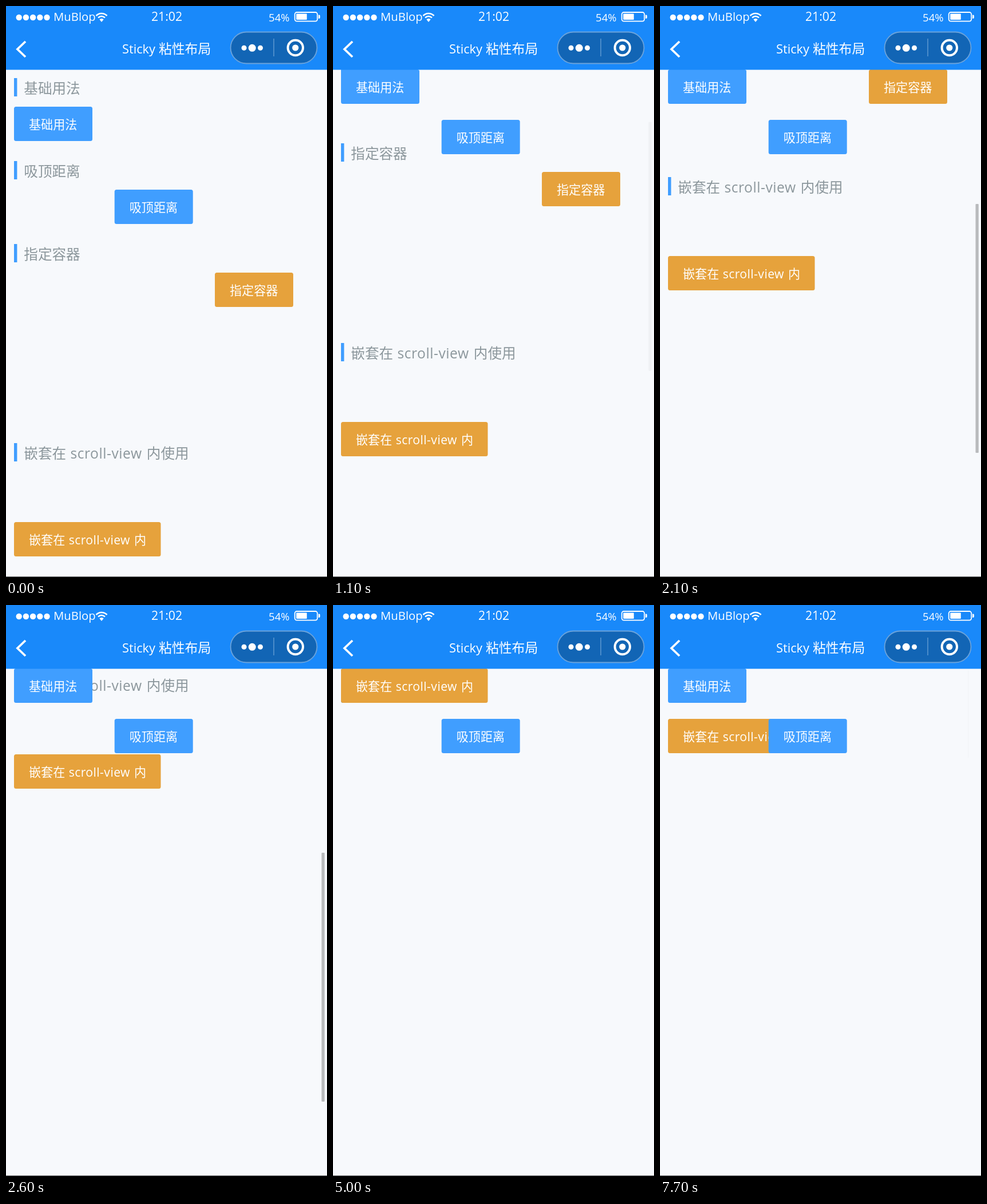
These frames come from a looping animation (561x998 px, 8 s). An HTML page with a canvas:

```html
<!DOCTYPE html>
<html lang="zh-CN">
<head>
<meta charset="utf-8">
<title>Sticky 粘性布局</title>
<style>
html, body { margin: 0; width: 100%; height: 100%; overflow: hidden; background: #f7f9fc; }
canvas { display: block; width: 100vw; height: 100vh; }
</style>
</head>
<body>
<canvas id="stage"></canvas>
<script>
const W = 561, H = 998, LOOP = 8000, TICK = 100;
const BLUE = '#409eff', AMBER = '#e6a23c', GREY = '#8c979c', HEADER = '#1989fa', PAGE = '#f7f9fc';
const FONT = '"Open Sans", "Noto Sans CJK SC", "Noto Sans CJK", sans-serif';
const TOP = 111.4;          // lower edge of the header
const NOTCH = 175.75;       // one wheel notch
const INNER_MAX = 437.5;
const BTN_H = 60, BTN_PAD = 26;

// Wheel moves: [start, duration, distance]
const pageMoves = [[420, 150, NOTCH], [1320, 150, NOTCH], [1950, 250, NOTCH], [2450, 250, NOTCH]];
const innerMoves = [
  [3050, 250, NOTCH], [3650, 250, NOTCH], [4250, 250, INNER_MAX - 2 * NOTCH],
  [6150, 250, -NOTCH], [6620, 150, -NOTCH], [6950, 250, 2 * NOTCH - INNER_MAX]
];

// Scrollbar opacity: [time, value], held until the next entry
const pageBar = [[0, 0], [500, .25], [1000, .12], [1100, .03], [1400, .25], [1800, .17], [1900, .1],
  [2000, .25], [3100, .1], [3200, .03], [3300, 0]];
const innerBar = [[0, 0], [3100, .27], [4800, .17], [4900, .07], [5000, 0],
  [6200, .27], [7600, .1], [7700, .01]];

const canvas = document.getElementById('stage');
const ctx = canvas.getContext('2d');

function smooth(p) {
  p = Math.min(1, Math.max(0, p));
  return p * p * (3 - 2 * p);
}

function travel(moves, t) {
  return moves.reduce((sum, [start, dur, dist]) => sum + dist * smooth((t - start) / dur), 0);
}

function held(track, t) {
  return track.reduce((value, [at, next]) => t >= at ? next : value, 0);
}

function box(x, y, w, h, r, color) {
  ctx.fillStyle = color;
  ctx.beginPath();
  ctx.roundRect(x, y, w, h, r);
  ctx.fill();
}

function disc(x, y, r, color = '#fff') {
  ctx.fillStyle = color;
  ctx.beginPath();
  ctx.arc(x, y, r, 0, Math.PI * 2);
  ctx.fill();
}

function line(points, width, color = '#fff') {
  ctx.strokeStyle = color;
  ctx.lineWidth = width;
  ctx.beginPath();
  points.forEach(([x, y]) => ctx.lineTo(x, y));
  ctx.stroke();
}

function text(str, x, y, size, color = '#fff', spacing = 0) {
  ctx.font = `${size}px ${FONT}`;
  ctx.letterSpacing = spacing + 'px';
  ctx.fillStyle = color;
  ctx.fillText(str, x, y);
}

// Chinese, Latin, Chinese, spaced as on the small phone screen
function mixedText(head, tail, x, y, size, color) {
  text(head, x, y, size, color);
  text('scroll-view', x + size * 3.3, y, size, color, size * .022);
  text(tail, x + size * 8.72, y, size, color);
}

function heading(label, y, tail) {
  y = Math.round(y);
  box(14, y, 5.4, 32, 0, BLUE);
  if (tail) mixedText(label, tail, 31.3, y + 27, 24.6, GREY);
  else text(label, 31.3, y + 27, 24.6, GREY);
}

function button(label, x, y, color, tail) {
  y = Math.round(y);
  box(x, y, tail ? 256.5 : 137, BTN_H, 3.5, color);
  if (tail) mixedText(label, tail, x + BTN_PAD, y + 38.5, 21.1, '#fff');
  else text(label, x + BTN_PAD, y + 38.5, 21.1);
}

function thumb(x, y, w, h, alpha) {
  if (alpha) box(x, y, w, h, 1, `rgba(0,0,0,${alpha})`);
}

function statusBar() {
  for (let i = 0; i < 5; i++) disc(22.7 + i * 12.2, 20, 5.2);
  text('MuBlop', 83, 26, 20.3);

  ctx.strokeStyle = '#fff';
  ctx.lineWidth = 2.6;
  for (const r of [8, 13]) {
    ctx.beginPath();
    ctx.arc(167, 26, r, -Math.PI * .76, -Math.PI * .24);
    ctx.stroke();
  }
  ctx.fillStyle = '#fff';
  ctx.beginPath();
  ctx.moveTo(167, 28);
  ctx.arc(167, 27, 5, -Math.PI * .76, -Math.PI * .24);
  ctx.fill();

  text('21:02', 254, 26, 21.2);
  text('54%', 459, 26.5, 18.6);
  ctx.lineWidth = 1.8;
  ctx.beginPath();
  ctx.roundRect(504.7, 11, 39.5, 15.6, 3.5);
  ctx.stroke();
  box(507.3, 13.6, 18.5, 10.4, 1, '#fff');
  box(546, 15.5, 3, 6.5, [0, 2, 2, 0], '#fff');
}

function capsule() {
  box(392.5, 45.5, 151, 55, 27.5, '#1265b5');
  ctx.strokeStyle = '#6ba3db';
  ctx.lineWidth = 1.8;
  ctx.stroke();
  disc(416, 73.3, 4.5);
  disc(430.2, 73.3, 6.5);
  disc(444.5, 73.3, 4.5);
  line([[468, 57], [468, 88]], 1.6, '#5b96d0');
  ctx.strokeStyle = '#fff';
  ctx.lineWidth = 4;
  ctx.beginPath();
  ctx.arc(505.8, 73, 13.2, 0, Math.PI * 2);
  ctx.stroke();
  disc(505.8, 73, 5.6);
}

function header() {
  box(0, 0, W, TOP, 0, HEADER);
  statusBar();
  line([[34, 62], [20, 75.5], [34, 89]], 3.8);
  text('Sticky', 203, 83, 21.8);
  text('粘性布局', 267, 83, 22.8);
  capsule();
}

function page(scroll, inner) {
  heading('基础用法', 126 - scroll);
  heading('吸顶距离', 270.7 - scroll);
  heading('指定容器', 415.7 - scroll);
  heading('嵌套在', 764.4 - scroll, '内使用');

  const containerEnd = 729.3 - scroll;
  button('指定容器', 365, Math.min(Math.max(465.7 - scroll, TOP), containerEnd - BTN_H), AMBER);
  button('基础用法', 14, Math.max(176 - scroll, TOP), BLUE);
  button('嵌套在', 14, Math.max(902.3 - scroll - inner, TOP), AMBER, '内');
  button('吸顶距离', 189.7, Math.max(320.7 - scroll, TOP + 88), BLUE);
}

function draw(time) {
  const t = Math.floor(time % LOOP / TICK) * TICK;
  const scroll = travel(pageMoves, t);
  const inner = travel(innerMoves, t);
  const scale = window.devicePixelRatio || 1;
  const w = Math.round(innerWidth * scale), h = Math.round(innerHeight * scale);
  if (canvas.width !== w || canvas.height !== h) {
    canvas.width = w;
    canvas.height = h;
  }
  ctx.setTransform(w / W, 0, 0, h / H, 0, 0);
  box(0, 0, W, H, 0, PAGE);
  page(scroll, inner);
  thumb(551.5, 116 + scroll * .4943, 5.3, 435, held(pageBar, t));
  thumb(537.4, 114 + inner * .44, 2.6, 153.7, held(innerBar, t));
  header();
  box(0, 997, W, 1, 0, '#626466');
}

const began = performance.now();
function frame() {
  draw(performance.now() - began);
  requestAnimationFrame(frame);
}
frame();
</script>
</body>
</html>
```
